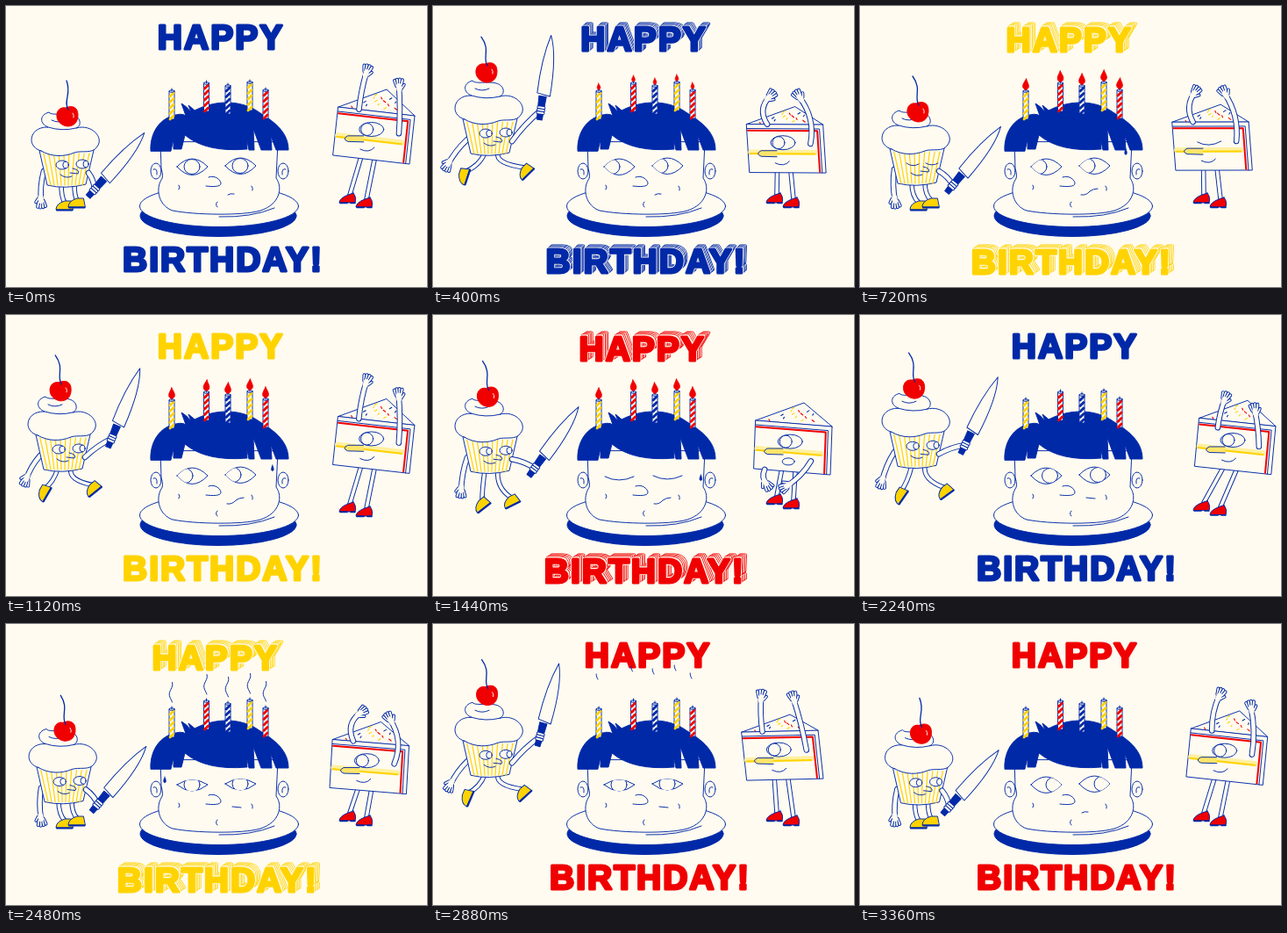
An HTML page that plays this animation: 480x320 px, repeating every 3.44 s.

```html
<!DOCTYPE html>
<html lang="en">
<head>
<meta charset="utf-8">
<title>Happy Birthday</title>
<style>
html, body { margin: 0; width: 100%; height: 100%; overflow: hidden; background: #fffbf0; }
svg { display: block; width: 480px; height: 320px; }
text { font: bold 39px "Liberation Sans", Arial, sans-serif; letter-spacing: 2px; text-anchor: middle; }
</style>
</head>
<body>
<svg id="stage" viewBox="0 0 480 320" stroke-linejoin="round" stroke-linecap="round"></svg>
<script>
const LOOP = 3440, STEP = 80;
const PAPER = '#fffbf0', BLUE = '#0029a8', RED = '#f00000', YELLOW = '#ffd300';

const clamp = (v, a = 0, b = 1) => Math.min(b, Math.max(a, v));
const mix = (a, b, k) => a + (b - a) * k;
const ramp = (t, a, b) => { const k = clamp((t - a) / (b - a)); return k * k * (3 - 2 * k); };
const pulse = (t, a, b, fade = 160) => ramp(t, a, a + fade) - ramp(t, b - fade, b);
const hump = v => Math.max(0, 1 - v * v);

const shape = (d, fill = PAPER, stroke = BLUE, w = .95) =>
  `<path d="${d}" fill="${fill}" stroke="${stroke}" stroke-width="${w}"/>`;
const line = (d, stroke = BLUE, w = .95) => shape(d, 'none', stroke, w);
const oval = (x, y, rx, ry, fill = PAPER, stroke = BLUE) =>
  `<ellipse cx="${x}" cy="${y}" rx="${rx}" ry="${ry}" fill="${fill}" stroke="${stroke}" stroke-width=".95"/>`;
const place = (x, y, angle, body) =>
  `<g transform="translate(${x} ${y}) rotate(${angle})">${body}</g>`;
const tube = (d, w) => line(d, BLUE, w) + line(d, PAPER, w - 1.9);

/* ---------- lettering ---------- */
function word(text, x, y, color, depth) {
  const layer = (k, fill, w) =>
    `<text x="${x - 6.3 * k * depth}" y="${y + (4.8 * k - 1.7) * depth}" fill="${fill}" stroke="${fill}" stroke-width="${w}">${text}</text>`;
  let out = '';
  if (depth > 0) {
    for (let i = 0; i < 4; i++) out += layer(i / 4, color, 3.2) + layer(i / 4, PAPER, 1.6);
    out += layer(1, PAPER, 4.6);
  }
  return out + layer(1, color, 3);
}

// Six colour beats per loop; each pops out of the page and settles back.
function lettering(t) {
  const beat = t / LOOP * 6, n = Math.floor(beat), frames = LOOP / 6 / STEP;
  const since = (beat - n) * frames, left = frames - since;
  const depth = clamp(Math.min(since - .3, left - 1.1) / 1.5);
  const color = [BLUE, YELLOW, RED][n % 3];
  return word('HAPPY', 245, 48.5, color, depth) + word('BIRTHDAY!', 247.5, 301.5, color, depth);
}

/* ---------- head on a plate ---------- */
const plate = oval(242, 239, 89, 23.5, BLUE) + oval(243, 228, 90.5, 23.5);
const face =
  oval(171, 188, 6, 9) + oval(316, 188, 6, 9) +
  line('M168 186Q173 184 172 192M319 186Q314 184 315 192') +
  shape('M176 155L177 185Q180 195 177 198C170 210 175 228 190 233C215 238 270 239 290 233C312 226 316 207 308 196L310 155Z') +
  line('M243 240Q280 241 306 230M231 195C238 192 245 198 245 202C245 206 236 206 228 205M241 223Q238 226 241 229M197 204Q199 206 197 209M280 205Q282 207 281 210');
const hair = shape('M165 165C164 148 172 132 187 126Q200 121 205 125L200 111Q206 114 211 121L208 113Q212 116 215 119C240 106 270 107 290 122C308 133 322 145 322 164L308 164L302 148L303 164L291 164L282 140L283 164L277 164L274 150L275 163Q228 167 204 147L200 163L191 163L191 152L188 165Z', BLUE);

function eye(x, y, gaze, open, id) {
  if (open < .1) return line(`M${x - 16} ${y + 1}Q${x} ${y + 9} ${x + 17} ${y + 1}`);
  const d = `M${x - 17} ${y}Q${x} ${y - 18 * open} ${x + 18} ${y}Q${x} ${y + 19 * Math.max(open, .75)} ${x - 17} ${y}Z`;
  return `<clipPath id="${id}"><path d="${d}"/></clipPath>` + shape(d) +
    `<g clip-path="url(#${id})">${oval(x + gaze, y, 9, 8.5)}</g>`;
}

const drop = (x, y) => shape(`M${x} ${y - 4}Q${x + 3} ${y + 2} ${x} ${y + 3}Q${x - 3} ${y + 2} ${x} ${y - 4}Z`, BLUE, BLUE, .4);

function head(t) {
  const gaze = 9 * (pulse(t, 1560, 2320) + ramp(t, 3040, 3200) * (1 - ramp(t, 3360, 3460))) - 8 * pulse(t, 0, 1400);
  const open = 1 - pulse(t, 1240, 1680) - .38 * pulse(t, 2240, 3120);
  const mouth = t >= 640 && t < 2240 ? 'M252 215Q258 216 262 211Q266 208 271 208'
    : t >= 2240 && t < 3040 ? 'M258 208L268 209' : 'M253 215Q256 213 260 214';
  const slide = (t - 640) / 1280;
  let out = plate + face + eye(212, 183, gaze, open, 'eyeL') + eye(267, 182, gaze, open, 'eyeR') + line(mouth) + hair;
  if (slide >= 0 && slide < 1.1) out += drop(mix(303, 309, slide * slide), mix(166, 208, slide ** 1.6));
  if (t >= 2400 && t < 2800) out += drop(181, 174 + (t - 2400) / 20);
  return out;
}

/* ---------- candles ---------- */
const CANDLES = [[189, 97, YELLOW], [228.5, 88, RED], [253, 91, BLUE], [278, 87, YELLOW], [296, 96, RED]];

function candle([x, y, color]) {
  let out = shape(`M${x - 3} ${y}V${y + 32}H${x + 3}V${y}Z`);
  for (let k = 3; k < 32; k += 6.5) out += line(`M${x - 2} ${y + k + 3}L${x + 2} ${y + k - 1}`, color, 2.8);
  return out + oval(x, y, 3, 1.3) + line(`M${x} ${y}V${y - 3}`);
}

// The breath comes from the right and takes one candle after another.
function flame([x, y], i, t) {
  const grow = ramp(t, 200, 560), k = clamp((t - 2000 + 80 * i) / 160);
  if (grow <= 0 || k >= 1) return '';
  const sway = Math.sin(t / 95 + x) * .6;
  const body = shape(`M${sway} -12C1 -9 4 -6 3.2 -2.5C2 1 -2 1 -3.2 -2.5C-4 -6 -1 -9 ${sway} -12Z`, RED, RED);
  return place(x - 4 * k, y - 2, -84 * k, `<g transform="scale(${grow} ${grow * (1 + 1.5 * k)})">${body}</g>`);
}

function smoke([x, y], t) {
  const tail = Math.max(3, 8 + .065 * (t - 2480));
  const tip = Math.min((t - 2240) * .13, 31 + .025 * (t - 2480));
  if (tip - tail < 1) return '';
  let d = '';
  for (let h = tail; h <= tip; h += 1.5) d += `${d ? 'L' : 'M'}${x - 1 + 1.8 * Math.sin(h / 3.6)} ${y - h}`;
  return line(d);
}

function candles(t) {
  const puff = t >= 1680 && t <= 2080
    ? place((1920 - t) / -30, 0, 0, line('M333 95Q322 96 322 91Q325 86 328 91Q325 95 317 92L309 91M331 102Q324 97 317 101M330 89Q332 85 334 89')) : '';
  return CANDLES.map((c, i) => candle(c) + flame(c, i, t) + smoke(c, t)).join('') + puff;
}

/* ---------- limbs ---------- */
function hand(x, y, angle) {
  const fingers = [-4.5, -1.6, 1.5, 4.4].map(f => `M${f * .6} 0L${f} ${-8 + Math.abs(f) * .35}`);
  return place(x, y, angle, fingers.map(d => tube(d, 4)).join('') + tube('M3 3L6 -1', 3.6) + line('M0 4V0', PAPER, 6));
}

function arm(x0, y0, x1, y1, bend, withHand = true) {
  const dx = x1 - x0, dy = y1 - y0, len = Math.hypot(dx, dy) || 1;
  const cx = (x0 + x1) / 2 - dy / len * bend, cy = (y0 + y1) / 2 + dx / len * bend;
  const angle = Math.atan2(y1 - cy, x1 - cx) * 180 / Math.PI + 90;
  return tube(`M${x0} ${y0}Q${cx} ${cy} ${x1} ${y1}`, 6.5) + (withHand ? hand(x1, y1, angle) : '');
}

/* ---------- cupcake ---------- */
const boot = (x, y, angle) => place(x, y, angle,
  shape('M7 -6H0Q-10 -3 -10 4H9Z', YELLOW) + line('M-9 4.5H8.5', BLUE, 2.2));
const knife = shape('M19 -7Q58 -8 86 -1Q64 9 17 8Z') + shape('M-11 -3L16 -4.5L16 4L-11 3Z', BLUE);

function cupcakeBody(asleep) {
  let out = shape('M37 160L47 204Q68 209 91 203L101 160Z');
  for (let i = 1; i < 11; i++) out += line(`M${37 + i * 5.8} 168L${47 + i * 4} 204`, YELLOW, 1.2);
  out += asleep ? line('M57 181Q64 186 71 182M79 181Q86 185 93 181')
    : oval(64, 181, 7, 5) + oval(87, 180, 7, 5) + oval(68, 181, 3.2, 3.8) + oval(91, 180, 3, 3.8);
  out += line('M76 185Q85 187 82 191L73 190M62 192Q68 197 75 194');
  out += shape('M40 165C22 160 27 137 48 138C38 134 38 124 49 121C53 127 80 117 84 131C85 136 82 138 80 139C98 134 112 150 104 160C99 169 86 164 78 167C66 172 52 172 40 165Z');
  return out + line('M48 138Q64 143 80 139M52 130Q60 134 68 130');
}

// Four hops per loop: a parabola for the height, a sharper arc for the splayed limbs.
function cupcake(t) {
  const p = t % (LOOP / 4);
  const air = hump((p - 410) / 310), s = hump((p - 380) / 280) ** 1.5;
  const lean = ramp(p, 0, 160) - ramp(p, 745, 790);
  const dx = -4 * lean, dy = -36 * air - 2 * lean * (1 - air);
  const lx = 67 - 32 * s, ly = 228 - 35 * s, la = -72 * s ** .6;
  const rx = 81 + 25 * s, ry = 225 - 37 * s, ra = -45 * Math.sqrt(s);
  const kx = 101 + 17 * Math.sqrt(s) + 5 * lean, ky = 209 - 86 * s - 5 * lean, ka = -48 - 32 * s * s - 2 * lean;
  const cx = 70 - 4 * lean - 5 * air, cy = 126 + dy - 3 * lean - 11 * s;
  const leg = (x, fx, fy, a) => tube(`M${x + dx} ${203 + dy}Q${x + dx + a * .08} ${(203 + dy + fy) / 2 + 2} ${fx} ${fy - 4}`, 5.5);

  return leg(63, lx, ly, la) + leg(78, rx, ry, ra) + boot(lx, ly, la) + boot(rx, ry, ra) +
    arm(43 + dx, 188 + dy, 40 - 23 * s, 222 - 42 * s ** .6, 3) +
    place(dx, dy, 0, cupcakeBody(t >= 640 && t < 800)) +
    place(cx, cy, 0, shape('M-2 -10C4 -13 12 -12 12 -2C12 7 7 11 0 11C-8 10 -13 4 -12 -3C-11 -9 -6 -11 -2 -10Z', RED, RED) +
      line(`M1 -8C-5 -18 5 -26 ${-1 - 5 * lean} -41`, BLUE, 1.3) + line('M6 -4Q8 -2 7 1', PAPER)) +
    arm(94 + dx, 190 + dy, kx, ky, -3, false) + place(kx, ky, ka, knife) +
    place(kx, ky, ka + 90, [-3, 0, 3].map(v => tube(`M-3 ${v}H3`, 4)).join(''));
}

/* ---------- cake slice ---------- */
const shoe = (x, y, angle) => place(x, y, angle,
  shape('M6 -6L0 -4Q-10 0 -10 5L8 5Q10 -1 6 -6Z', RED) + line('M-9 5.4H-1M3 5.4H8', BLUE, 1.6));

// Three swaying beats; the middle one gives way to a crouch, a leap and a landing.
function slice(t) {
  const phase = t / LOOP * 6 * Math.PI, sway = Math.cos(phase), dip = Math.sin(phase) ** 2;
  const act = ramp(t, 1200, 1400) - ramp(t, 2060, 2300);
  const leap = clamp((t - 1470) / 570), height = 86 * Math.sin(Math.PI * leap ** .8);
  const air = ramp(t, 1480, 1680) - ramp(t, 1960, 2120);
  const blend = (dance, crouch, flight) => mix(dance, mix(crouch, flight, air), act);

  const x = blend(365.5 + 13.5 * sway, 368, 343) + 11 * hump((t - 2290) / 180);
  const y = blend(119 - 4 * sway + 20 * dip, 120, 124) - height;
  const tilt = blend(4 + 6 * sway, 7, -9), skew = blend(-6 * sway, -2, 1);
  const at = (u, v) => [x + 87 * u + skew * v, y + tilt * u + 55 * v];
  const path = (...pts) => 'M' + pts.map(([u, v]) => at(u, v).join(' ')).join('L');
  const foot = (gx, gy, fx, fy) => [mix(gx, x + fx, air), mix(gy - 9 * act, y + fy, air)];
  const left = foot(390, 219, 23, 76), right = foot(409, 224, 70, 81);
  const leg = (u, [fx, fy]) => tube(`M${at(u, 1)}L${fx + 2} ${fy - 4}`, 5.5);
  let out = leg(.36, left) + leg(.54, right) + shoe(...left, -10 * air) + shoe(...right, -35 * air);

  const top = [x + 55, y - 20];
  out += shape(`M${at(0, 0)}L${top}L${at(1, 0)}Z`);
  for (let i = 0; i < 14; i++) {
    const k = .1 + .62 * i / 14, [bx, by] = at(.12 + .76 * (i * .618 % 1), 0);
    out += line(`M${mix(bx, top[0], k)} ${mix(by, top[1], k)}l${i % 2 ? 2.5 : 1} ${i % 3 ? -1.5 : 2}`, [RED, YELLOW, BLUE][i % 3], 1.1);
  }
  out += shape(path([0, 0], [1, 0], [1, 1], [0, 1]) + 'Z');
  out += line(path([.03, .58], [.87, .58]), '#fff0a0', 6) + line(path([.02, .61], [.87, .61]), YELLOW, 2);
  out += line(path([.01, .13], [.92, .13], [.92, .98]), RED, 2) + line(path([0, .09], [.95, .09], [.95, 1]));

  const [ox, oy] = at(.46, .38), [nx, ny] = at(.28, .61), [mx, my] = at(.4, .82);
  out += t >= 640 && t < 800
    ? line(`M${ox - 13} ${oy + 2}Q${ox} ${oy + 9} ${ox + 14} ${oy + 1}`)
    : oval(ox, oy, 14, mix(8, 6, air)) + oval(ox - 5, oy, 7, mix(7, 5.5, air));
  out += shape(`M${nx + 8} ${ny - 3.5}H${nx - 10}Q${nx - 17} ${ny} ${nx - 10} ${ny + 3}L${nx + 8} ${ny + 3.5}`, '#ffe56a');
  out += t >= 1320 && t < 1600
    ? oval(mx + 4, my - 1, 7, 4)
    : line(`M${mx - 5} ${my - 1}Q${mx + 5} ${my + 4} ${mx + 11} ${my - 3}`);

  const bend = blend(2 + 16 * dip, -5, 4);
  const handL = [x + blend(27 + 5 * sway + 3 * dip, 12, 4), y + blend(-40 + 13 * dip, 72, 63)];
  const handR = [x + blend(64 + 5 * sway - 2 * dip, 35, 91), y + blend(-31 + 7 * sway + 6 * dip, 75, 59)];
  return out + arm(...at(mix(.27, .14, act), act), ...handL, -bend) + arm(...at(mix(.82, .74, act), .4 + act * .35), ...handR, bend);
}

/* ---------- loop ---------- */
const stage = document.getElementById('stage'), born = performance.now();
let shown = -1;

function render(t) {
  stage.innerHTML = `<rect width="480" height="320" fill="${PAPER}"/>` +
    lettering(t) + head(t) + candles(t) + cupcake(t) + slice(t);
}

function tick() {
  const t = Math.floor((performance.now() - born + 1) % LOOP / STEP) * STEP;
  if (t !== shown) render(shown = t);
  requestAnimationFrame(tick);
}
tick();
</script>
</body>
</html>
```
